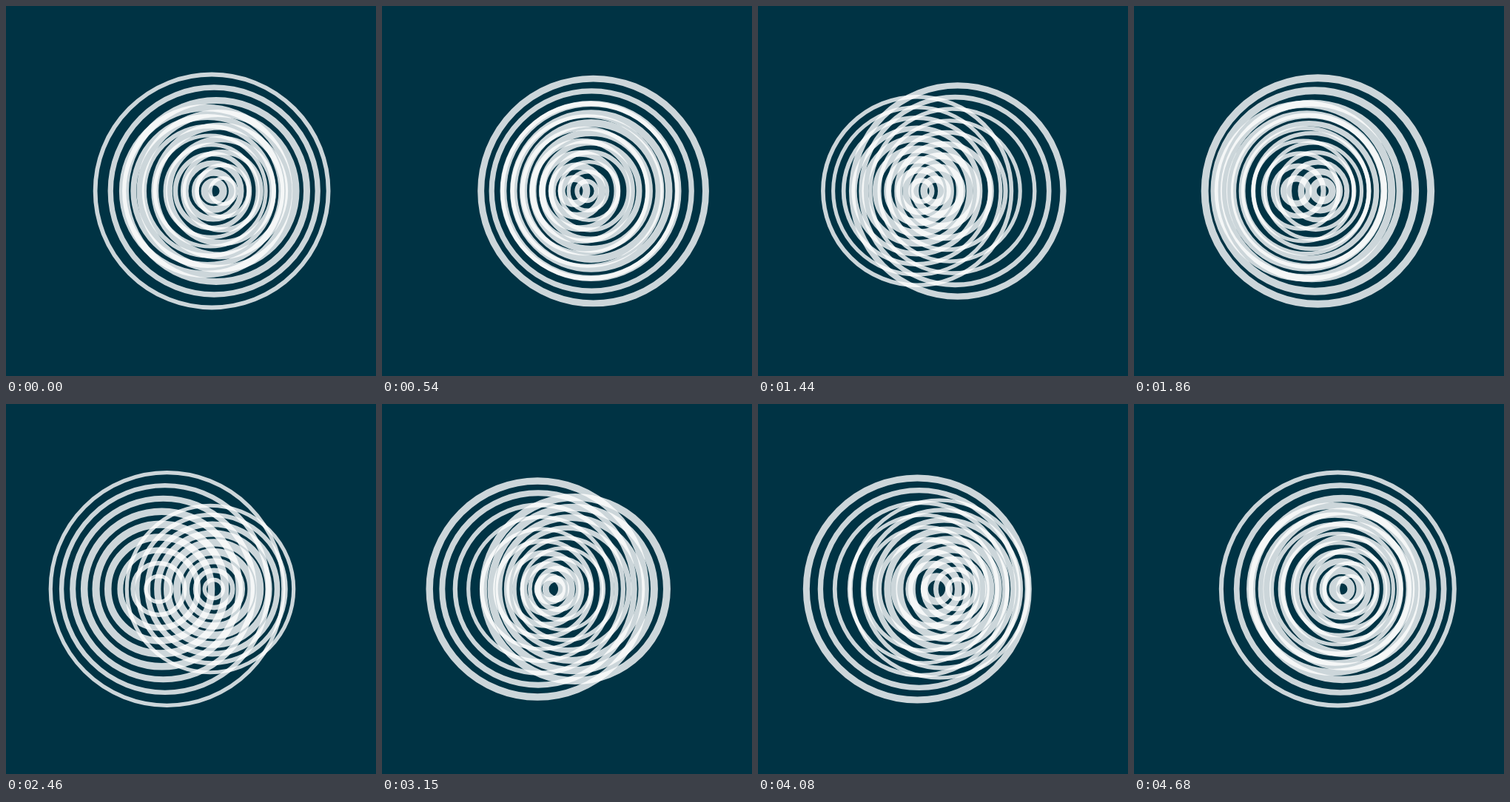
An HTML page with a canvas that plays this animation: 500x500 px, repeating every 4710 ms.

```html
<!DOCTYPE html>
<html lang="en">
<head>
<meta charset="utf-8">
<title>Swaying rings</title>
<style>
  html, body { margin: 0; width: 100%; height: 100%; overflow: hidden; background: #003344; }
  canvas { display: block; width: 100vw; height: 100vh; }
</style>
</head>
<body>
<canvas id="stage" width="500" height="500"></canvas>
<script>
const ctx = document.getElementById('stage').getContext('2d');
const LOOP = 4710, STEP = 30, RINGS = 9, CENTER = 250;
const LAG = 0.097;       // sway delay per ring, in radians
const WAVE = 0.7;        // line weight phase per ring, in radians

// sway and pulse are whole cycles per loop; zoom is the sign of the size swing
const sets = [
  { zoom: 1, sway: 2, pulse: 4, phase: 0.75 },
  { zoom: -1, sway: 1, pulse: 3, phase: 0.35 + 3 * Math.PI * 2 * 2460 / LOOP }
];

function drawSet({ zoom, sway, pulse, phase }, angle) {
  const gap = 15 + 2.5 * zoom * Math.cos(angle);
  for (let i = 1; i <= RINGS; i++) {
    const x = CENTER + 2.5 * gap * Math.cos(sway * angle - LAG * i);
    ctx.lineWidth = 7.6 - 2.5 * Math.cos(phase + WAVE * (RINGS - i) - pulse * angle);
    ctx.beginPath();
    ctx.arc(x, CENTER, gap * i, 0, Math.PI * 2);
    ctx.stroke();
  }
}

function draw(ms) {
  const time = Math.floor((ms % LOOP) / STEP) * STEP;
  const angle = time / LOOP * Math.PI * 2;
  ctx.fillStyle = '#003344';
  ctx.fillRect(0, 0, 500, 500);
  ctx.strokeStyle = 'rgba(255, 255, 255, 0.8)';
  sets.forEach(set => drawSet(set, angle));
}

const start = performance.now();
function tick() {
  draw(performance.now() - start);
  requestAnimationFrame(tick);
}
tick();
</script>
</body>
</html>
```
